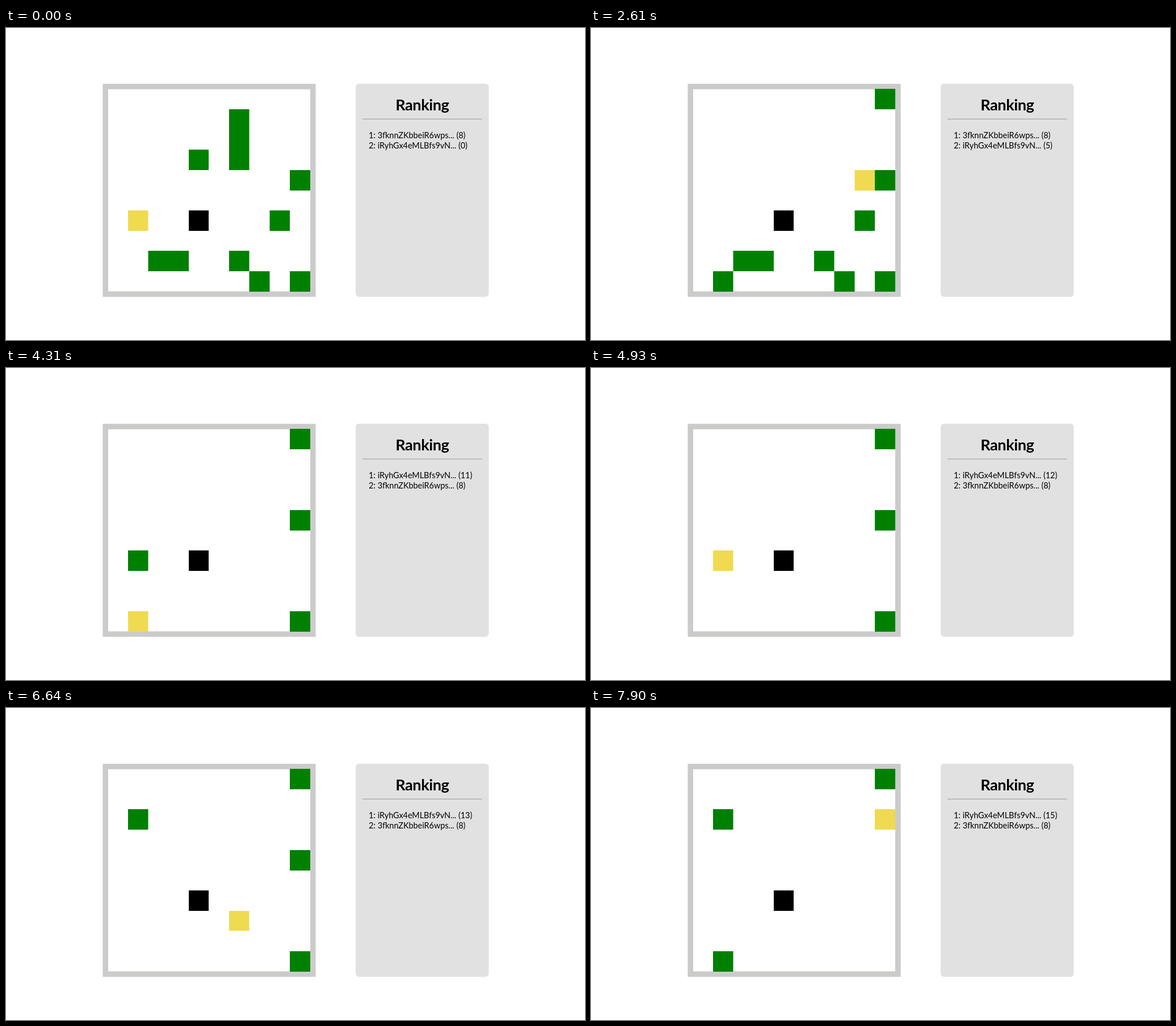
Write an HTML page that moves like this. It is 1020x549 px and loops after 8 s.

```html
<!DOCTYPE html>
<html lang="en">
<head>
<meta charset="utf-8">
<title>Ranking</title>
<style>
  html, body { margin: 0; width: 100%; height: 100%; overflow: hidden; background: #fff; }
  svg { display: block; width: 100vw; height: 100vh; }
  text { font-family: Lato, "Open Sans", sans-serif; fill: #000; }
  .title { font-size: 27px; font-weight: 700; text-anchor: middle; letter-spacing: -0.4px; }
  .row { font-size: 14.4px; }
</style>
</head>
<body>
<svg viewBox="0 0 1020 549">
  <rect x="175.2" y="103" width="365.6" height="365.2" fill="#fff" stroke="#cbcbca" stroke-width="9.6"/>
  <rect x="616" y="98" width="234.5" height="375" rx="6" fill="#e1e1e1"/>
  <rect x="628" y="159.6" width="210.5" height="1.3" fill="#a8a8a8"/>
  <text class="title" x="733.3" y="145">Ranking</text>
  <text class="row" x="639" y="194"></text>
  <text class="row" x="639" y="212"></text>
  <g id="tiles"></g>
</svg>
<script>
const LOOP = 8000;
const X = [179.5, 215, 250.5, 286, 322, 357, 393, 428.5, 464.5, 500, 536];
const Y = [107, 143, 178, 214, 250, 286, 321, 357, 392, 428, 464];
const RIVAL = { name: "3fknnZKbbeiR6wps", score: 8 };
const PLAYER = "iRyhGx4eMLBfs9vN";
const DIRS = { U: [0, -1], D: [0, 1], L: [-1, 0], R: [1, 0] };

// Cells are "column row" digit pairs.
const fruitAtStart = "61 62 63 43 94 86 28 38 68 79 99".split(" ");
const spawns = "19 83 90 16 57 12 19".split(" ");

// First time, last time, evenly spaced steps: U D L R move, + adds a fruit.
const runs = [
  [860, 890, "U+"],
  [1090, 1390, "URRR"],
  [1520, 1880, "UR+RU"],
  [1980, 1980, "U"],
  [2180, 2610, "RRDD+D"],
  [2710, 2980, "DDDD"],
  [3180, 3310, "LD"],
  [3480, 4180, "LULLLL+L"],
  [4310, 4310, "D"],
  [4440, 5060, "LUUUR+U"],
  [5190, 5530, "URRRR"],
  [5630, 5630, "R"],
  [5800, 5800, "D"],
  [5970, 5970, "D"],
  [6200, 6200, "D"],
  [6370, 6440, "L+"],
  [6640, 6740, "RR"],
  [6870, 7000, "RD"],
  [7170, 7300, "DR+"],
  [7370, 7900, "UUUUUUU"]
];

function buildStates() {
  let x = 1, y = 6, score = 0, next = 0;
  const fruit = new Set(fruitAtStart);
  const states = [];
  const save = t => states.push({ t, cell: `${x}${y}`, score, fruit: [...fruit] });
  save(0);
  for (const [from, to, steps] of runs) {
    [...steps].forEach((step, i) => {
      if (step === "+") {
        fruit.add(spawns[next++]);
      } else {
        x += DIRS[step][0];
        y += DIRS[step][1];
        if (fruit.delete(`${x}${y}`)) score++;
      }
      save(Math.round(from + (to - from) * i / Math.max(1, steps.length - 1)));
    });
  }
  return states;
}

const states = buildStates();
const tiles = document.getElementById("tiles");
const rows = document.querySelectorAll(".row");

function tile(cell, color) {
  const [c, r] = [...cell].map(Number);
  return `<rect x="${X[c]}" y="${Y[r]}" width="${X[c + 1] - X[c]}" height="${Y[r + 1] - Y[r]}" fill="${color}"/>`;
}

function draw({ cell, score, fruit }) {
  tiles.innerHTML = fruit.map(f => tile(f, "#008000")).join("") +
    tile("46", "#000") + tile(cell, "#f0da50");
  const ranking = [RIVAL, { name: PLAYER, score }].sort((a, b) => b.score - a.score);
  ranking.forEach((p, i) => {
    rows[i].textContent = `${i + 1}: ${p.name}... (${p.score})`;
  });
}

let shown = null;
const start = performance.now();

function tick(now) {
  const t = Math.max(0, now - start) % LOOP;
  const state = states.findLast(s => s.t <= t);
  if (state !== shown) draw(shown = state);
  requestAnimationFrame(tick);
}
tick(start);
</script>
</body>
</html>
```
